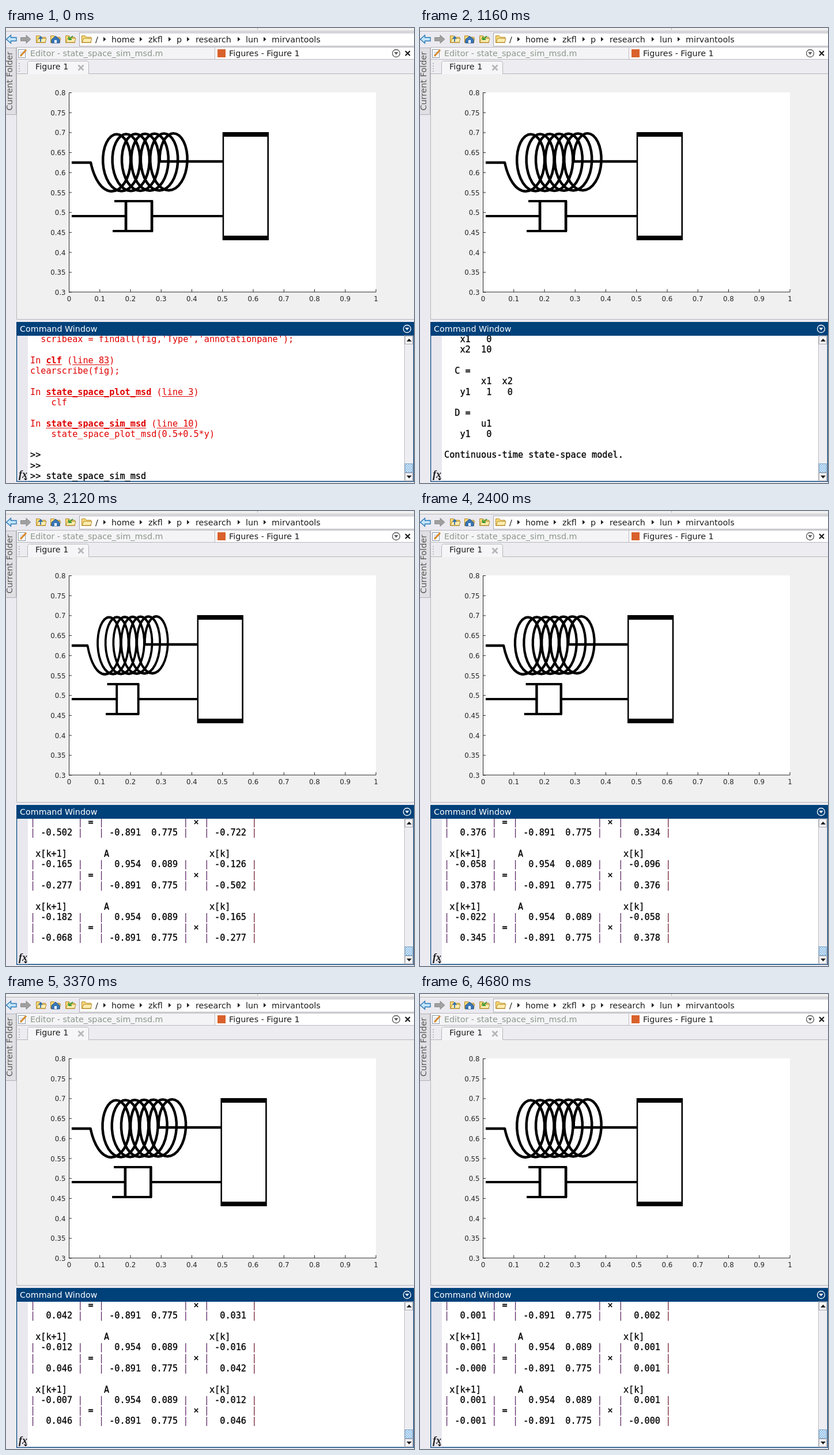
An HTML page that plays this animation: 708x791 px, repeating every 4780 ms.

```html
<!DOCTYPE html>
<html lang="en">
<head>
<meta charset="utf-8">
<title>Mass-spring-damper simulation</title>
<style>
  html, body { margin: 0; width: 100%; height: 100%; overflow: hidden; background: #ebeaf0; }
  #stage { position: absolute; left: 0; top: 0; width: 708px; height: 791px; overflow: hidden; }
  svg { position: absolute; left: 0; top: 0; }
  svg text { font: 14.3px "DejaVu Sans", sans-serif; fill: #1c1c1c; }
  svg #ticks text { font-size: 11.8px; fill: #262626; }
  #console { position: absolute; left: 42px; top: 535px; width: 648px; height: 253px; overflow: hidden; }
  pre {
    position: absolute; left: 0; bottom: -.4px; margin: 0; color: #000;
    font: 15.2px/18.31px "DejaVu Sans Mono", monospace;
    -webkit-text-stroke: .3px currentColor;
  }
  pre i { font-style: normal; color: #5a2462; -webkit-text-stroke: 0; }
  pre i.end { color: #6e1a30; }
  pre em { font-style: normal; color: #e00000; -webkit-text-stroke: 0; }
  pre u { text-underline-offset: 2px; }
  #caret { position: absolute; left: 244px; top: 769px; width: 1px; height: 18px; background: #000; }
</style>
</head>
<body>
<div id="stage">
<svg width="708" height="791" viewBox="0 0 708 791">
  <defs>
    <pattern id="dots" width="4" height="4" patternUnits="userSpaceOnUse">
      <rect width="4" height="4" fill="#d9ebfa"/>
      <path d="M0 0h2v2h-2zM2 2h2v2h-2z" fill="#8fbde4"/>
    </pattern>
    <g id="folder">
      <path d="M.5 12.500V2.500h6l2 2.500h8v9.500h-16z" fill="#f6d877" stroke="#b58a2c"/>
      <path d="M1 14l3-7h14l-2 7z" fill="#fdeeb0" stroke="#b58a2c"/>
    </g>
    <g id="menu">
      <circle r="6.500" fill="none" stroke-width="1.300"/>
      <path d="M-3.500 -2h7l-3.500 4.500z" stroke="none"/>
    </g>
  </defs>

  <!-- toolbar -->
  <rect width="708" height="791" fill="#ebeaf0"/>
  <rect width="708" height="5" fill="#f0f0f0"/>
  <path d="M0 5.500H708" stroke="#b4b4b8"/>
  <path d="M436.500 0v3" stroke="#b4b4b8"/>
  <path d="M.5 19.500l8-7v4h9.500v6H8.500v4z" fill="#c4e6fa" stroke="#2576b4" stroke-width="1.300"/>
  <path d="M43 19.500l-8-7v4h-9.500v6H35v4z" fill="#a0a0a0" stroke="#8a8a8a"/>
  <use href="#folder" x="52" y="11"/>
  <path d="M60 24v-8m-3 3l3-4 3 4" fill="none" stroke="#2a6cb0" stroke-width="1.800"/>
  <use href="#folder" x="77" y="11"/>
  <path d="M79 20l7-6 7 6v6H79z" fill="#3a77b8" stroke="#1d4e86"/>
  <rect x="84" y="21" width="4" height="5" fill="#fff"/>
  <use href="#folder" x="103" y="11"/>
  <path d="M116 14l-7 6m0-5v5h5" fill="none" stroke="#3b9b38" stroke-width="2"/>
  <rect x="127.500" y="8.500" width="590" height="23" fill="#fff" stroke="#a9a9b0"/>
  <use href="#folder" x="131" y="11"/>
  <g id="path"></g>

  <!-- side tab -->
  <path d="M0 34.500H17.500V150.500H0" fill="#e0e0e4" stroke="#b0b0b6"/>
  <text transform="translate(11 143.500) rotate(-90)" style="fill:#555">Current Folder</text>

  <!-- document tabs -->
  <rect x="18" y="33" width="690" height="22" fill="#f4f4f6"/>
  <rect x="363" y="33" width="345" height="21" fill="#fff"/>
  <path d="M18 33.500H708M18 54.500H708M362.500 33V54" stroke="#b8b8be"/>
  <rect x="21.500" y="37.500" width="12" height="14" fill="#fff" stroke="#8899aa"/>
  <path d="M24 42h7M24 45h5" stroke="#9ab6d4"/>
  <path d="M25 49L35 38" stroke="#d98a2b" stroke-width="3"/>
  <text x="42" y="49" style="fill:#8b968b">Editor - state_space_sim_msd.m</text>
  <rect x="367" y="37" width="14" height="14" fill="#d9612b"/>
  <text x="387" y="49">Figures - Figure 1</text>
  <use href="#menu" x="677" y="44" stroke="#555" fill="#555"/>
  <path d="M693 40l8 8m0-8l-8 8" stroke="#111" stroke-width="2"/>

  <!-- figure panel -->
  <rect x="18" y="55" width="690" height="24" fill="#ececf1"/>
  <rect x="18" y="79" width="690" height="428" fill="#f0f0f0"/>
  <path d="M18 79.500H37.500V61q0-3.500 4-3.500H139q4.500 0 4.500 4V79.500H708" fill="none" stroke="#b4b4ba"/>
  <path d="M38 80V61q0-3 4-3h97q4 0 4 4v18z" fill="#f6f6f8"/>
  <path d="M23 61v16" stroke="#999" stroke-width="1.500" stroke-dasharray="1.500 3"/>
  <text x="51" y="72">Figure 1</text>
  <path d="M125.500 64.500l9 9m0-9l-9 9" stroke="#b5b5b8" stroke-width="2.600"/>
  <path d="M18.500 34V506.500H708" fill="none" stroke="#b4b4ba"/>
  <rect x="109" y="112" width="533" height="347" fill="#fff"/>
  <g id="ticks"></g>
  <g id="linkage" fill="none" stroke="#000" stroke-width="4">
    <path id="spring" stroke-width="4.500" stroke-linejoin="round"/>
    <path d="M114 232M114 327H208M253 327H376M188 301H255M185 353H255"/>
    <path d="M253 301V353M208 301V353" stroke-width="4.700"/>
  </g>
  <g id="mass">
    <rect y="181" width="80.300" height="188"/>
    <rect x="2.500" y="189" width="75.200" height="172" fill="#fff"/>
  </g>

  <!-- command window -->
  <rect x="18" y="511" width="690" height="278" fill="#00417a"/>
  <text x="24" y="528" style="fill:#fff">Command Window</text>
  <use href="#menu" x="696" y="523" stroke="#fff" fill="#fff"/>
  <rect x="19.500" y="535" width="687" height="252.500" fill="#fff"/>
  <rect x="19.500" y="535" width="18.500" height="252.500" fill="#e9e8ef"/>
  <text x="22" y="782" style="font:italic bold 18px 'Liberation Serif',serif">fx</text>
  <path d="M31 783h6l-3 3.500z"/>
  <rect x="691.500" y="535" width="15" height="252.500" fill="#eeeef2" stroke="#bcbcc4"/>
  <g fill="#f6f6f8" stroke="#a8a8b0">
    <rect x="692.500" y="535.500" width="13" height="14"/>
    <rect x="692.500" y="773.500" width="13" height="13.500"/>
  </g>
  <rect x="692.500" y="757.500" width="13" height="15" fill="url(#dots)" stroke="#7ba6cc"/>
  <path d="M695 545h9l-4.500-5zM695 778h9l-4.500 5z" fill="#222"/>
</svg>
<div id="console"><pre id="log"></pre></div>
<div id="caret"></div>
</div>
<script>
const LOOP = 4780, ROWS = 14;
const $ = id => document.getElementById(id);

// Static parts built from short tables
const label = (x, y, s, anchor = 'start') =>
  `<text x="${x}" y="${y}" text-anchor="${anchor}">${s}</text>`;

$('path').innerHTML =
  [[155, '/'], [183, 'home'], [247, 'zkfl'], [296, 'p'], [329, 'research'], [416, 'lun'], [461, 'mirvantools']]
    .map(([x, s]) => label(x, 25, s)).join('') +
  [169, 232, 282, 314, 402, 447]
    .map(x => `<path d="M${x} 15.500l4.500 4-4.500 4z" fill="#222"/>`).join('');

let axes = '', marks = 'M109.500 112V459H642';
for (let i = 0; i <= 10; i++) {
  const x = 109.5 + 53.25 * i, y = 459.5 - 34.7 * i;
  marks += `M${x} 459v-5M109 ${y}h5`;
  axes += label(x, 475, +(i / 10).toFixed(1), 'middle');
  axes += label(103.5, y + 4.5, +(0.3 + i * 0.05).toFixed(2), 'end');
}
$('ticks').innerHTML = `<path d="${marks}" fill="none" stroke="#262626"/>` + axes;

let coil = 'M114 234H147C153 262 166 284 184 284';
for (let u = -0.25; u <= 6.501; u += 1 / 32) {
  const a = 2 * Math.PI * u;
  const x = 188 + 16.4 * u + 28 * Math.cos(a);
  const y = 234.2 - 0.25 * u - 49.5 * Math.sin(a);
  coil += `L${x.toFixed(2)} ${y.toFixed(2)}`;
}
$('spring').setAttribute('d', coil + 'M265 232H376');

// Console text
const red = s => s && `<em>${s}</em>`;
const at = (name, line) => `In <b><u>${name}</u></b> (<u>line ${line}</u>)`;
const intro = [
  ...[
    "  scribeax = findall(fig,'Type','annotationpane');", '',
    at('clf', 83), 'clearscribe(fig);', '',
    at('state_space_plot_msd', 3), '    clf', '',
    at('state_space_sim_msd', 10), '    state_space_plot_msd(0.5+0.5*y)', ''
  ].map(red),
  '&gt;&gt; ', '&gt;&gt; ', '&gt;&gt; state_space_sim_msd'
];
const model = [
  '', 'sys =', '',
  '  A = ', '       x1  x2', '   x1   0   1', '   x2 -10  -2', '',
  '  B = ', '       u1', '   x1   0', '   x2  10', '',
  '  C = ', '       x1  x2', '   y1   1   0', '',
  '  D = ', '       u1', '   y1   0', '',
  'Continuous-time state-space model.', ''
];

// Damped oscillation sampled every 0.1 s from x = [0.5, 0.5]
function state(k) {
  const t = k / 10, e = Math.exp(-t), c = Math.cos(3 * t), s = Math.sin(3 * t);
  return [e * (c / 2 + s / 3), e * (c / 2 - s * 11 / 6)];
}

const bar = '<i>|</i>', end = '<i class="end">|</i>';
const num = v => v.toFixed(3).padStart(6);
const row = (a, m, b, eq = ' ', times = ' ') =>
  `${bar} ${a} ${bar} ${eq} ${bar} ${m} ${bar} ${times} ${bar} ${b} ${end}`;

function block(k) {
  const next = state(k), prev = state(k - 1), gap = ' '.repeat(6);
  return [
    ' x[k+1]       A                   x[k]',
    row(num(next[0]), ' 0.954  0.089', num(prev[0])),
    row(gap, ' '.repeat(13), gap, '=', '×'),
    row(num(next[1]), '-0.891  0.775', num(prev[1])),
    ''
  ];
}

// Timeline: printed model lines, then runs of [from, to, count, first k, last k]
const scenes = [{ at: 0, lines: -1, k: 0 }];
for (const [at, lines] of [[720, 0], [870, 13], [1080, 17], [1120, 21], [1160, 23]])
  scenes.push({ at, lines, k: 0 });
const runs = [
  [1380, 1750, 5, 1, 5], [1820, 1820, 1, 6, 6], [1920, 2400, 10, 8, 17],
  [2450, 2910, 11, 18, 29], [3000, 3520, 12, 30, 41], [3570, 3910, 7, 42, 48],
  [3950, 4080, 4, 49, 52], [4120, 4640, 12, 53, 64], [4680, 4680, 1, 65, 65]
];
for (const [from, to, n, first, last] of runs)
  for (let i = 0; i < n; i++) {
    const f = n > 1 ? i / (n - 1) : 0;
    scenes.push({
      at: Math.round((from + (to - from) * f) / 10) * 10,
      lines: model.length,
      k: Math.round(first + (last - first) * f)
    });
  }

function show({ lines, k }) {
  const out = [...intro];
  if (lines >= 0) {
    out.push(...model.slice(0, lines));
    for (let j = 1; j <= k; j++) out.push(...block(j));
    out.push('');
  }
  $('log').innerHTML = out.slice(-ROWS).map(s => s || ' ').join('\n');

  const y = k ? state(k - 1)[0] : 0.0008;
  const left = 375.5 + 266.5 * y;
  $('mass').setAttribute('transform', `translate(${left} 0)`);
  $('linkage').setAttribute('transform', `translate(114 0) scale(${(left - 114) / 261.5} 1) translate(-114 0)`);
}

const start = performance.now();
let shown = null;
function tick() {
  const t = (performance.now() - start) % LOOP;
  const scene = scenes.findLast(s => s.at <= t);
  if (scene !== shown) show(shown = scene);
  $('caret').hidden = t < 290 || t >= 720;
  requestAnimationFrame(tick);
}
tick();
</script>
</body>
</html>
```
